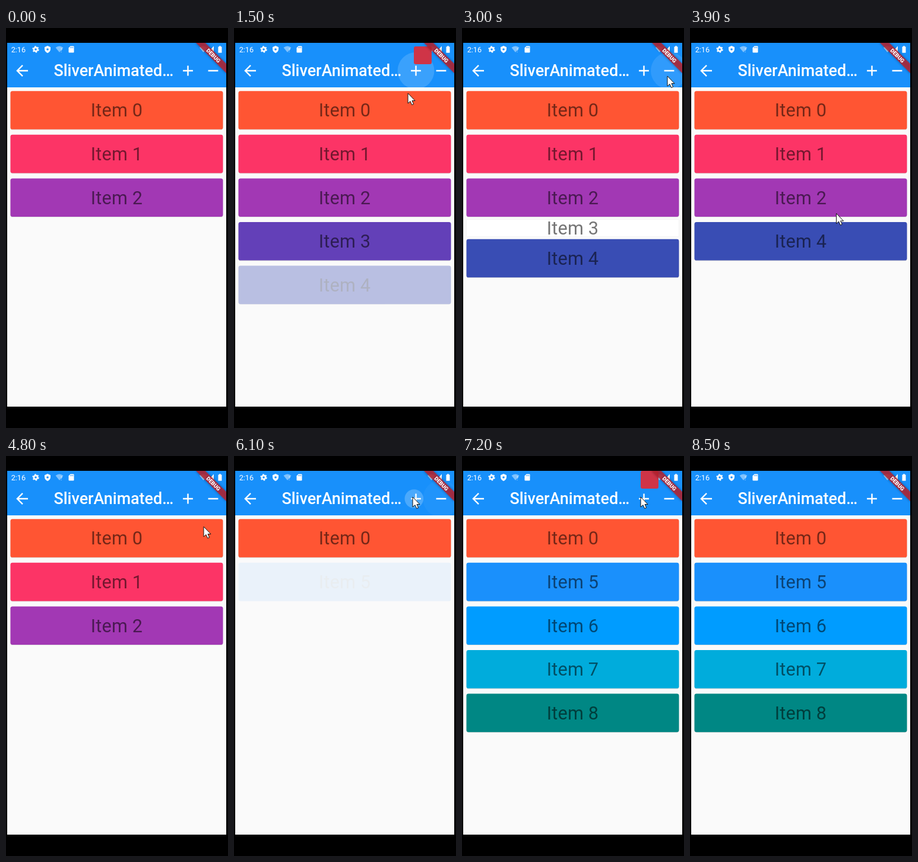
An HTML page that plays this animation: 374x674 px, repeating every 8.6 s.

```html
<!DOCTYPE html>
<html lang="en">
<head>
<meta charset="utf-8">
<title>Animated list</title>
<style>
  html, body { margin: 0; width: 100%; height: 100%; overflow: hidden; background: #000; }
  #stage { display: block; width: 100vw; height: 100vh; font-family: Roboto, sans-serif; }
  .label { font-size: 30.6px; letter-spacing: .2px; text-anchor: middle; fill: #000; fill-opacity: .54; }
</style>
</head>
<body>
<svg id="stage" viewBox="0 0 374 674">
  <defs>
    <clipPath id="screen"><rect x="2" y="25" width="369" height="613"/></clipPath>
    <clipPath id="bar"><rect x="2" y="25" width="369" height="75"/></clipPath>
    <filter id="soft" x="-20%" y="-100%" width="140%" height="300%"><feGaussianBlur stdDeviation="2"/></filter>
  </defs>
  <g clip-path="url(#screen)">
    <rect x="2" y="25" width="369" height="613" fill="#fafafa"/>
    <g id="list"></g>
    <rect x="2" y="25" width="369" height="75" fill="#1890fb"/>
    <g id="splashes" fill="#fff" clip-path="url(#bar)"></g>

    <!-- status bar -->
    <g fill="#fff">
      <text x="8.7" y="41" font-size="12.6">2:16</text>
      <g fill="none" stroke="#fff">
        <circle cx="50" cy="36" r="3.1" stroke-width="2.6"/>
        <circle cx="50" cy="36" r="4.9" stroke-width="1.6" stroke-dasharray="2.6 2.53"/>
      </g>
      <path d="M70 30l5 2.2v3.4c0 3-2 5.500-5 6.600c-3-1.100-5-3.600-5-6.600v-3.400z"/>
      <circle cx="70" cy="36" r="1.800" fill="#1890fb"/>
      <path d="M83.500 33q6.500-5 13 0l-6.500 8z" opacity=".45"/>
      <path d="M92 35.500q2.500-2 2.500 0q0 1-1.500 2v1m0 1.500v1" fill="none" stroke="#fff" opacity=".7"/>
      <path d="M108.500 30.500h5a1 1 0 0 1 1 1v9a1 1 0 0 1-1 1h-7a1 1 0 0 1-1-1v-7z"/>
      <path d="M108.700 32v2m2 -2v2m2-2v2" stroke="#1890fb" stroke-width=".9"/>
      <path d="M326 33q6.500-5 13 0l-6.500 8z" opacity=".6"/>
      <path d="M350 30.500v11h-10z"/>
      <path d="M357.500 31.500h1.700v-1.300h2.600v1.300h1.700v10.300h-6z"/>
    </g>

    <!-- toolbar -->
    <g fill="none" stroke="#fff" stroke-width="2.4">
      <path d="M37 72H20M28 62.800L18.900 72L28 81.200"/>
      <path d="M298.100 72h16.800M306.500 63.600v16.800M340.600 72h16.800"/>
    </g>
    <text x="80.500" y="81.300" font-size="26.9" font-weight="500" fill="#fff">SliverAnimated…</text>

    <rect id="popup" width="30" height="30" rx="3" fill="#cf3447"/>

    <!-- corner ribbon -->
    <g transform="translate(371 25) rotate(45)">
      <rect x="-36" y="25" width="72" height="11" opacity=".4" filter="url(#soft)"/>
      <rect x="-36" y="25" width="72" height="11" fill="#bd2330" fill-opacity=".82"/>
      <text x="0" y="33.800" font-size="9.2" font-weight="900" text-anchor="middle" fill="#fff">DEBUG</text>
    </g>
  </g>
  <path id="cursor" d="M0 0V17L4 13.500L6.700 19.500L9.600 18.200L7 12.500H12Z" fill="#fff" stroke="#111" stroke-width="1"/>
</svg>
<script>
const LOOP = 8600, STEP = 100, FADE = 300;
const ROW = 73.6, LIST_TOP = 101.8;
const PLUS = 306.5, MINUS = 349;

const items = [
  { color: '#ff5533', add: -FADE },
  { color: '#fc3466', add: -FADE, remove: 5250 },
  { color: '#a238b4', add: -FADE, remove: 5720 },
  { color: '#6340b8', add: 1150, remove: 2817 },
  { color: '#394db4', add: 1400, remove: 4300 },
  { color: '#1a90fc', add: 6080 },
  { color: '#009cff', add: 6260 },
  { color: '#00acdc', add: 6445 },
  { color: '#008784', add: 6640 }
];

// time, x, y
const cursorPath = [
  [400, 320, 230], [900, 301, 69], [1420, 301, 69], [1500, 293, 110],
  [1900, 215, 352], [2250, 215, 352], [2650, 346, 81], [3150, 346, 81],
  [3600, 230, 352], [3850, 230, 352], [4200, 346, 76], [4600, 346, 81],
  [4800, 333, 119], [5000, 300, 205], [5200, 346, 76], [5300, 346, 76],
  [5500, 310, 205], [5680, 346, 76], [5800, 346, 76], [6000, 301, 69],
  [8200, 301, 69], [8400, 270, 190]
];

const popups = [
  { from: 1450, to: 2000, x: 303, y: 31 },
  { from: 6400, to: 7700, x: 301, y: 25 }
];

const byId = id => document.getElementById(id);
const clamp01 = v => Math.min(1, Math.max(0, v));
const mix = (a, b, k) => a + (b - a) * k;

function make(parent, tag, attrs = {}) {
  const node = document.createElementNS('http://www.w3.org/2000/svg', tag);
  setAttrs(node, attrs);
  return parent.appendChild(node);
}
function setAttrs(node, attrs) {
  for (const key in attrs) node.setAttribute(key, attrs[key]);
}

items.forEach((item, i) => {
  item.row = make(byId('list'), 'svg', { x: 0, width: 374, overflow: 'hidden' });
  item.body = make(item.row, 'g');
  const box = { x: 7.5, width: 358, height: 64.6, rx: 3.4 };
  make(item.body, 'rect', { ...box, y: 5.2, fill: '#000', opacity: .15 });
  item.card = make(item.body, 'rect', { ...box, y: 4.4 });
  make(item.body, 'text', { x: 186.5, y: 47.7, class: 'label' }).textContent = 'Item ' + i;
});

const clicks = items.flatMap(({ add, remove }) => [
  ...(add > 0 ? [{ time: add, x: PLUS }] : []),
  ...(remove ? [{ time: remove, x: MINUS }] : [])
]);
clicks.forEach(click => {
  click.node = make(byId('splashes'), 'circle', { cy: 72 });
});

function drawList(t) {
  let top = LIST_TOP;
  for (const { add, remove = Infinity, color, row, body, card } of items) {
    const removed = t >= remove;
    const height = t < add ? 0 : removed ? ROW * clamp01(1 - (t - remove) / FADE) : ROW;
    setAttrs(row, { y: top, height });
    setAttrs(body, {
      transform: `translate(0 ${(height - ROW) / 2})`,
      opacity: clamp01((t - add) / FADE)
    });
    card.setAttribute('fill', removed ? '#fff' : color);
    top += height;
  }
}

function drawSplashes(t) {
  for (const { time, x, node } of clicks) {
    const age = t - time;
    const grow = clamp01(age / 100);
    const alpha = age < 0 ? 0 : age < 100 ? mix(.25, .1, grow) : .1 * clamp01((450 - age) / 200);
    setAttrs(node, { cx: mix(x - 4, x, grow), r: mix(12, 31, grow), opacity: alpha });
  }
}

function drawPointer(t) {
  const next = cursorPath.findIndex(key => key[0] > t);
  const cursor = byId('cursor');
  cursor.style.display = next > 0 ? '' : 'none';
  if (next > 0) {
    const [t0, x0, y0] = cursorPath[next - 1], [t1, x1, y1] = cursorPath[next];
    const k = (t - t0) / (t1 - t0);
    cursor.setAttribute('transform', `translate(${mix(x0, x1, k)} ${mix(y0, y1, k)})`);
  }
  const shown = popups.find(p => t >= p.from && t < p.to);
  byId('popup').style.display = shown ? '' : 'none';
  if (shown) setAttrs(byId('popup'), { x: shown.x, y: shown.y });
}

function frame() {
  const t = Math.floor(performance.now() % LOOP / STEP) * STEP;
  drawList(t);
  drawSplashes(t);
  drawPointer(t);
  requestAnimationFrame(frame);
}
frame();
</script>
</body>
</html>
```
